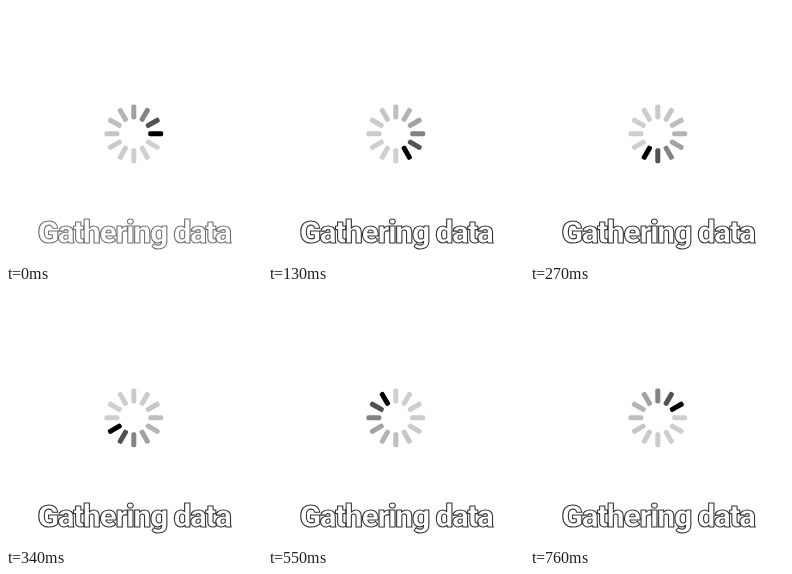
Recreate the animation shown at these times as an HTML page. Size 256 by 256 pixels, loop 0.82 s.

```html
<!DOCTYPE html>
<html lang="en">
<head>
<meta charset="utf-8">
<title>Gathering data</title>
<style>
  html, body { margin: 0; width: 100%; height: 100%; overflow: hidden; background: #fff; }
  svg { display: block; width: 100vw; height: 100vh; }
  text {
    font-family: Roboto, Lato, sans-serif;
    font-weight: 900;
    font-stretch: 75%;
    letter-spacing: -.045em;
    fill: #fff;
    stroke-width: 1.1px;
    stroke-linejoin: round;
  }
</style>
</head>
<body>
<svg viewBox="0 0 256 256">
  <g id="spinner" transform="translate(127.8 127.8)"></g>
  <text id="label" x="31.5" y="226" dy=".36em" font-size="28">Gathering data</text>
</svg>
<script>
  const LOOP = 820, FIRST = 60, STEP = 70, COUNT = 12;
  const START_SPOKE = 3, LABEL_WIDTH = 193;

  const spinner = document.getElementById("spinner");
  const label = document.getElementById("label");
  const grey = v => `rgb(${v},${v},${v})`;

  // Grey level by steps since a spoke was the head: a quick fade to pale grey.
  const fade = age => Math.round(208 * (1 - Math.exp(-age / 2)));

  const spokes = Array.from({ length: COUNT }, (_, i) => {
    const bar = document.createElementNS("http://www.w3.org/2000/svg", "rect");
    const attrs = { x: -2.5, y: -29.4, width: 5, height: 15, rx: 1.8, transform: `rotate(${i * 360 / COUNT})` };
    for (const key in attrs) bar.setAttribute(key, attrs[key]);
    return spinner.appendChild(bar);
  });

  // Choose the type size at which the line has its full width.
  const size = 28 * LABEL_WIDTH / label.getComputedTextLength();
  label.setAttribute("font-size", size);

  function draw(time) {
    const t = time % LOOP;
    const step = t < FIRST ? 0 : 1 + Math.floor((t - FIRST) / STEP);
    const head = START_SPOKE + step;
    spokes.forEach((bar, i) => bar.setAttribute("fill", grey(fade((head - i + COUNT) % COUNT))));
    label.setAttribute("stroke", grey(step ? 50 : 110));
  }

  function frame(now) {
    draw(now);
    requestAnimationFrame(frame);
  }
  draw(0);
  requestAnimationFrame(frame);
</script>
</body>
</html>
```
